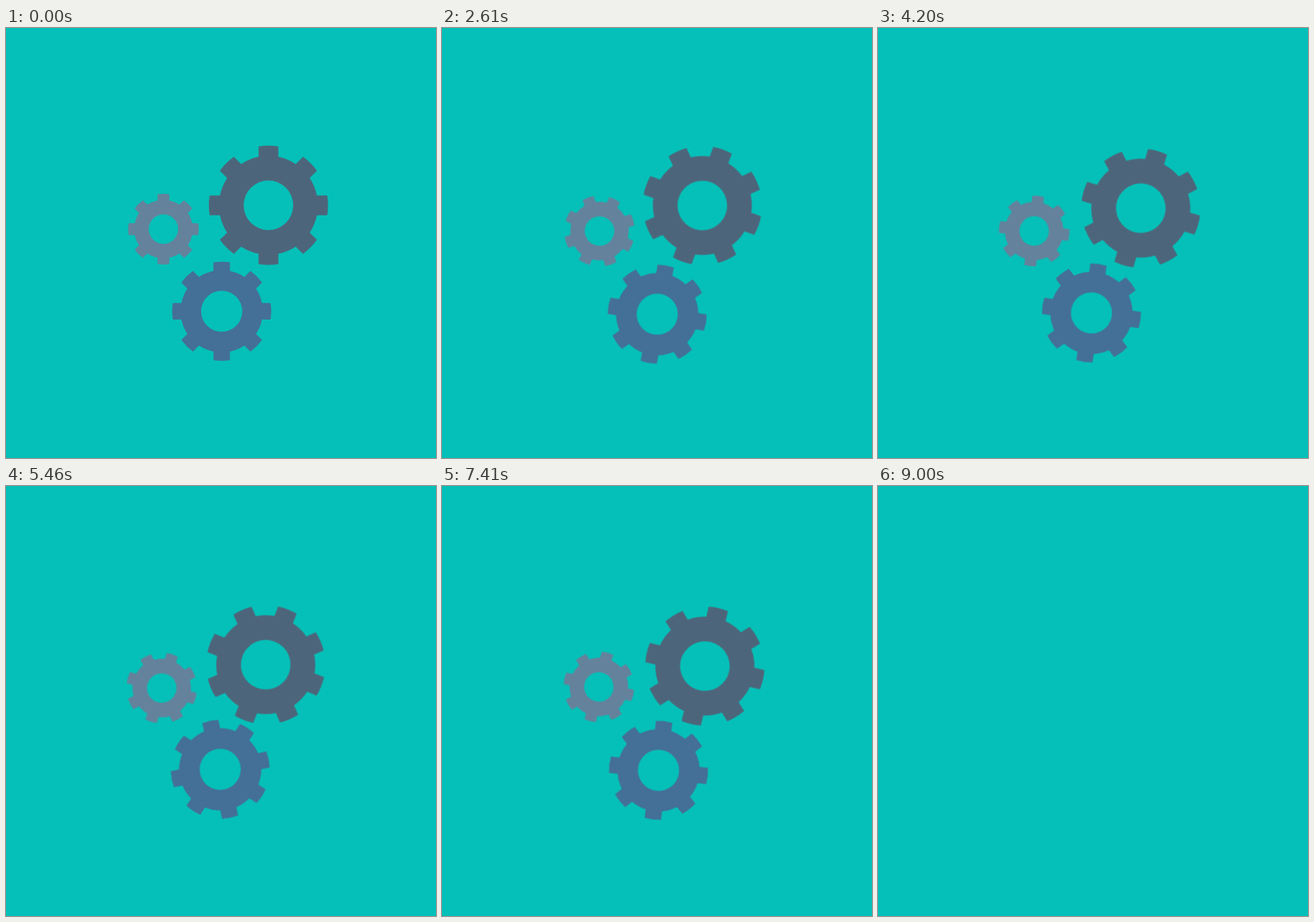
Recreate the animation shown at these times as an HTML page. Size 500 by 500 pixels, loop 9030 ms.

```html
<!DOCTYPE html>
<html lang="en">
<head>
<meta charset="utf-8">
<title>Turning gears</title>
<style>
  html, body { margin: 0; width: 100%; height: 100%; overflow: hidden; background: #05c0b8; }
  svg { display: block; width: 100%; height: 100%; }
</style>
</head>
<body>
<svg viewBox="0 0 500 500"><g id="gears"></g></svg>
<script>
  const STEP = 30, STEPS = 301, LOOP = STEP * STEPS;
  const TEETH = 8;

  // Each gear turns about a pivot slightly off its centre (dx, dy at the start).
  const gears = [
    { color: '#4d657b', r: 69.3, pivot: [304.1, 208], dx: 1.05, dy: -1.82, turn: 1000 },
    { color: '#446f97', r: 57.6, pivot: [250, 331], dx: 0.81, dy: -1.66, turn: 500 },
    { color: '#64829c', r: 41.1, pivot: [182.4, 235], dx: 0.68, dy: -1.17, turn: 400 }
  ];

  function gearPath(cx, cy, r) {
    const body = r * 0.83, hole = r * 0.416, half = r * 0.166;
    const tip = Math.asin(half / r), base = Math.asin(half / body);
    const at = (radius, angle) =>
      `${(cx + radius * Math.cos(angle)).toFixed(3)} ${(cy + radius * Math.sin(angle)).toFixed(3)}`;
    const arc = (radius, angle) => `A${radius} ${radius} 0 0 1 ${at(radius, angle)}`;

    let d = `M${at(body, -base)}`;
    for (let i = 0; i < TEETH; i++) {
      const a = i * 2 * Math.PI / TEETH;
      const next = a + 2 * Math.PI / TEETH;
      d += `L${at(r, a - tip)}${arc(r, a + tip)}L${at(body, a + base)}${arc(body, next - base)}`;
    }
    return `${d}ZM${at(hole, 0)}${arc(hole, Math.PI)}${arc(hole, 2 * Math.PI)}Z`;
  }

  const group = document.getElementById('gears');

  for (const { color, r, pivot: [px, py], dx, dy, turn } of gears) {
    const path = document.createElementNS('http://www.w3.org/2000/svg', 'path');
    path.setAttribute('d', gearPath(px + dx, py + dy, r));
    path.setAttribute('fill', color);
    path.setAttribute('fill-rule', 'evenodd');
    path.style.transformOrigin = `${px}px ${py}px`;
    group.append(path);
    // turn is in degrees per 9 seconds
    path.animate(
      [{ transform: 'rotate(0deg)' }, { transform: `rotate(${turn * LOOP / 9000}deg)` }],
      { duration: LOOP, iterations: Infinity, easing: `steps(${STEPS}, end)` }
    );
  }

  // The last step of the loop is empty.
  const end = (STEPS - 1) / STEPS;
  group.animate(
    [
      { opacity: 1, offset: 0 },
      { opacity: 1, offset: end },
      { opacity: 0, offset: end },
      { opacity: 0, offset: 1 }
    ],
    { duration: LOOP, iterations: Infinity }
  );
</script>
</body>
</html>
```
